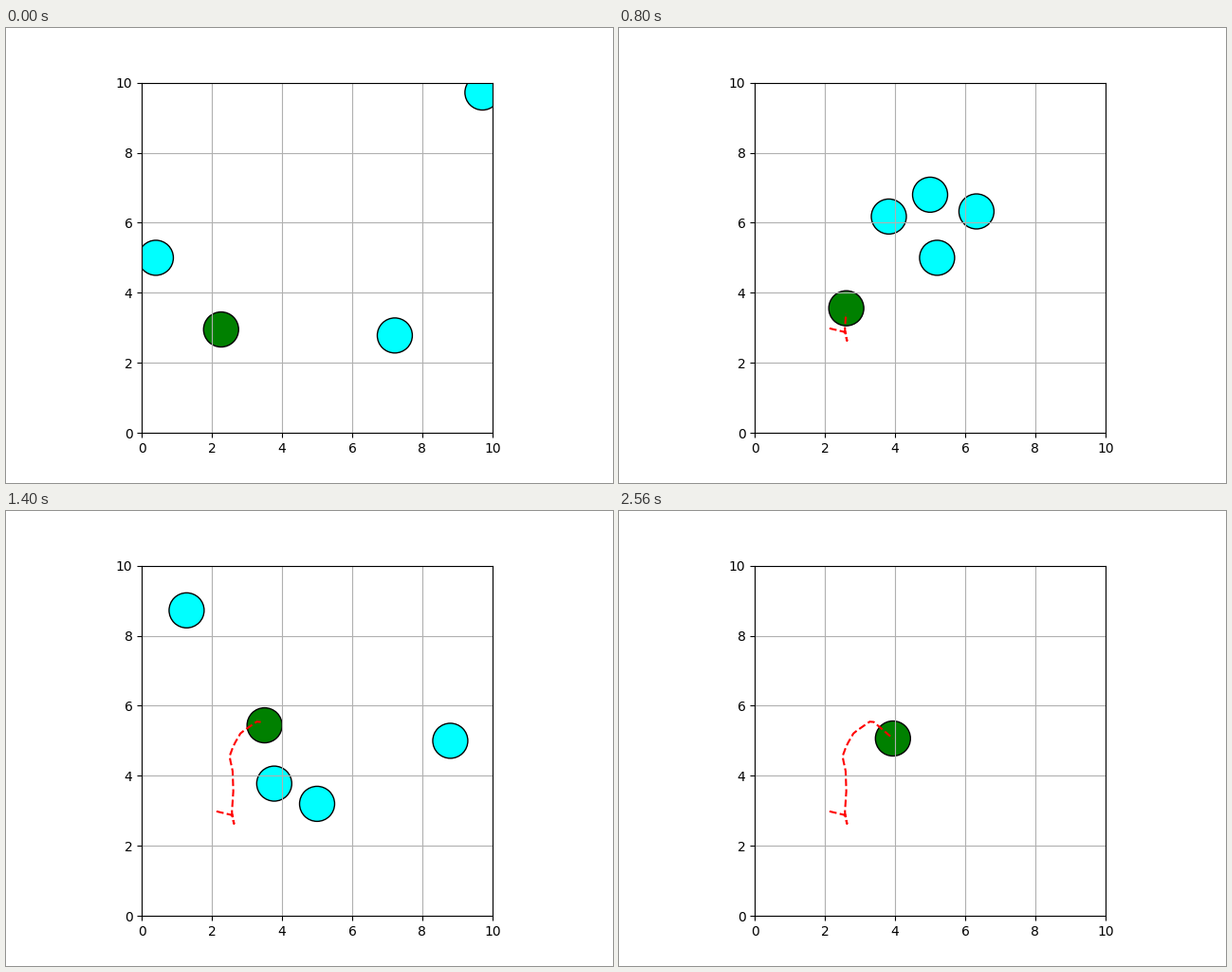
A matplotlib script for the animation above (2640 ms loop, 640 by 480 pixels).

```python
import numpy as np
import matplotlib.pyplot as plt
from matplotlib.animation import FuncAnimation

FRAMES, INTERVAL = 132, 20   # 2640 ms loop
SPEED = 0.2                  # obstacle travel per step
DIAG = SPEED / np.sqrt(2)

# Obstacles: start position and velocity per step
OBSTACLES = [
    ((0, 5), (SPEED, 0)),
    ((5, 12), (0, -SPEED)),
    ((10, 10), (-DIAG, -DIAG)),
    ((7.5, 2.5), (-DIAG, DIAG)),
]

# Robot path: dodge down to the third point, then climb to the goal
PATH = np.array([
    (2.13, 2.985), (2.57, 2.88), (2.63, 2.63),
    (2.57, 2.96), (2.61, 3.565), (2.59, 4.145), (2.5, 4.55),
    (2.62, 4.875), (2.825, 5.23), (3.335, 5.585), (3.94, 5.065),
])
ARC = np.append(0, np.cumsum(np.hypot(*np.diff(PATH, axis=0).T)))
DODGE = ARC[2]
TURN, ARRIVE = 9, 46         # steps at which the robot turns and stops
CREEP, CRUISE = 0.055, 0.1444


def travelled(step):
    """Distance along the path: brake into the dodge, creep, then cruise."""
    left = np.clip((TURN - step) / (TURN + 1), 0, 1)
    climb = np.maximum(CREEP * (step - TURN), ARC[-1] - DODGE - CRUISE * (ARRIVE - step))
    return np.where(step < TURN, DODGE * (1 - left ** 2), DODGE + climb)


def robot_at(step):
    dist = travelled(np.minimum(step, ARRIVE))
    return [np.interp(dist, ARC, axis) for axis in PATH.T]


fig, ax = plt.subplots(figsize=(6.4, 4.8), dpi=100)
ax.set_aspect("equal")
ax.set(xlim=(0, 10), ylim=(0, 10))
ax.grid(True)


def add_disc(color):
    return ax.add_patch(plt.Circle((0, 0), 0.5, facecolor=color, edgecolor="black"))


robot = add_disc("green")
discs = [add_disc("cyan") for _ in OBSTACLES]
trail, = ax.plot([], [], "--r")


def update(i):
    step = (6 * i + 5) // 10   # the simulation runs at 30 steps per second
    robot.center = robot_at(step)
    for disc, (start, velocity) in zip(discs, OBSTACLES):
        disc.center = tuple(np.add(start, np.multiply(velocity, step + 2)))
    trail.set_data(*robot_at(np.arange(-1, min(step, ARRIVE + 1))))
    return [robot, trail, *discs]


anim = FuncAnimation(fig, update, frames=FRAMES, interval=INTERVAL, repeat=True,
                     repeat_delay=0, blit=False)
plt.show()
```
